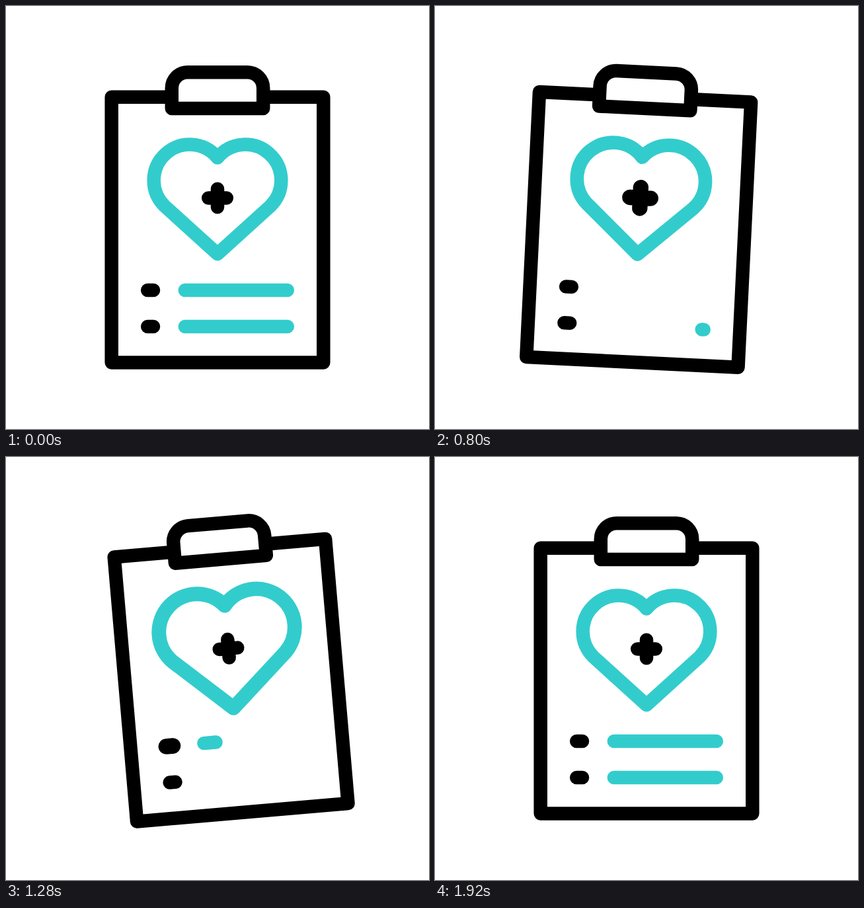
Animation, 640 px wide and 640 px high, one loop 2.04 s. Source, as an HTML page:

```html
<!DOCTYPE html>
<html>
<head>
<meta charset="utf-8">
<style>
  html, body { margin: 0; height: 100%; overflow: hidden; background: #fff; }
  svg { display: block; width: 100%; height: 100%; }
  path, rect { fill: none; stroke: #000; stroke-width: 20.5; stroke-linecap: round; stroke-linejoin: round; }
  .teal { stroke: #33cccc; }
  #clip { fill: #fff; }
</style>
</head>
<body>
<svg viewBox="0 0 640 640">
  <g id="board">
    <rect x="159.7" y="137.8" width="320.6" height="401.6"/>
    <path id="clip" d="M250.8 155V124.3a24 24 0 0 1 24-24h90.4a24 24 0 0 1 24 24V155Z"/>
    <path id="heart" class="teal" d="M320 229.5A54.3 54.3 0 1 0 239.8 302.5L320 375.2L400.2 302.5A54.3 54.3 0 1 0 320 229.5Z"/>
    <path id="plus" d="M306.2 290.5h27.6M320 276.7v27.6"/>
    <path id="dot0"/>
    <path id="dot1"/>
    <path id="line0" class="teal"/>
    <path id="line1" class="teal"/>
  </g>
</svg>
<script>
const LOOP = 2040, STEP = 40, START = 200, HALF = 1000;
const ROW_TOP = 430.1, ROW_GAP = 54.8, ROW_DELAY = 125;
const LEFT = 270.8, LENGTH = 155, DOT_X = 218.6;

const el = id => document.getElementById(id);
const smooth = u => u * u * (3 - 2 * u);

// Progress from 0 to 1, linear or eased at both ends.
const linear = (t, start, duration) => Math.min(1, Math.max(0, (t - start) / duration));
const ramp = (t, start, duration) => smooth(linear(t, start, duration));

// Cubic Bezier easing (0.33, 0, 0.23, 1), solved by bisection.
function sweep(x) {
  let lo = 0, hi = 1;
  for (let i = 0; i < 20; i++) {
    const s = (lo + hi) / 2, r = 1 - s;
    if (s * r * r + 0.69 * s * s * r + s * s * s < x) lo = s; else hi = s;
  }
  return smooth(lo);
}

function place(id, x, y, scale, angle = 0) {
  el(id).setAttribute('transform',
    `translate(${x} ${y}) rotate(${angle}) scale(${scale}) translate(${-x} ${-y})`);
}

const pop = t => 1 + 0.35 * (ramp(t, 0, 220) - ramp(t, 220, 210));

// Each row pops its dot twice; its line is erased first, then drawn again.
function drawRow(i, t) {
  const y = ROW_TOP + i * ROW_GAP;
  const time = t - START - i * ROW_DELAY;
  const redraw = time > HALF;
  const p = sweep(linear(time, redraw ? HALF : 0, 600));
  const from = redraw ? 0 : p, to = redraw ? p : 1;

  place('dot' + i, DOT_X, y, pop(redraw ? time - HALF : time));
  el('dot' + i).setAttribute('d', `M${DOT_X - 4.4} ${y}h8.8`);
  el('line' + i).setAttribute('d',
    to - from > 0.001 ? `M${LEFT + LENGTH * from} ${y}h${LENGTH * (to - from)}` : '');
}

function draw(t) {
  const tilt = 4 * ramp(t, START, 450) - 9 * ramp(t, 700, 525) + 5 * ramp(t, 1268, 407);
  const beat = 1 - 0.073 * ramp(t, START, 170) + 0.145 * ramp(t, 370, 830) - 0.072 * ramp(t, 1200, 700);
  const pulse = 1 - 0.195 * ramp(t, START, 240) + 0.335 * ramp(t, 440, 360) - 0.14 * ramp(t, 800, 400);

  place('board', 320, 98, 1, tilt);
  place('heart', 320, 292.5, beat);
  place('plus', 320, 290.5, pulse, -180 * ramp(t, START, 600));
  drawRow(0, t);
  drawRow(1, t);
}

const begin = performance.now();
function tick() {
  const t = (performance.now() - begin) % LOOP;
  // Poses change every 40 ms and show the middle of their step.
  const pose = Math.floor(t / STEP) * STEP;
  draw(pose > START ? pose + STEP / 2 : 0);
  requestAnimationFrame(tick);
}
tick();
</script>
</body>
</html>
```
